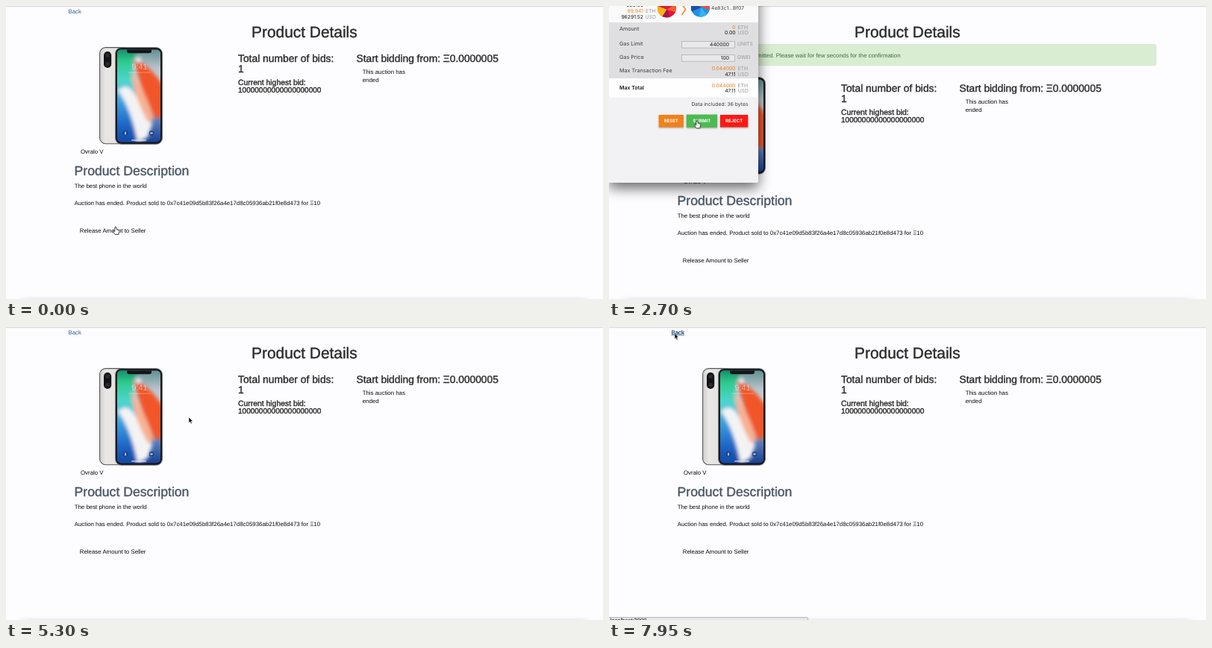
Recreate the animation shown at these times as an HTML page. Size 800 px wide and 393 px high, loop 8 s.

```html
<!DOCTYPE html>
<html lang="en">
<head>
<meta charset="utf-8">
<title>Product Details</title>
<style>
  html, body { margin: 0; width: 100%; height: 100%; overflow: hidden; background: #fdfcfe; }
  svg { display: block; width: 100%; height: 100%; font: 7.86px "Liberation Sans", Arial, sans-serif; fill: #0c0c0c; text-rendering: geometricPrecision; }
  .medium { stroke: currentColor; stroke-width: .4; color: #2b2b2b; fill: #2b2b2b; }
  .slate { color: #4b5766; fill: #4b5766; }
  .end { text-anchor: end; }
  .mid { text-anchor: middle; }

  .popup { font: 7.2px Inter, "Open Sans", sans-serif; fill: #3c3c3e; filter: drop-shadow(0 7px 9px rgba(0, 0, 0, .6)); }
  .small { font-size: 6.8px; }
  .eth { fill: #f08122; }
  .unit { fill: #98989b; }
  .dark { fill: #161616; }
  .button { font-size: 6px; font-weight: 700; fill: #fff; text-anchor: middle; }
  .button rect { filter: drop-shadow(0 1px 1px rgba(0, 0, 0, .35)); }

  .page, .alert, .popup, .ring, .status, .hover, .hand, .arrow { animation: 8s step-end infinite; }
  .page { animation-name: page; }
  .alert { animation-name: alert; }
  .popup { animation-name: popup; }
  .ring { animation-name: ring; }
  .status, .hover { animation-name: late; }
  .hand { animation-name: hand; }
  .arrow { animation-name: arrow; }
  .cursor { animation: move 8s ease-in-out infinite; }

  @keyframes page { 0%, 58.75% { transform: none; } 5% { transform: translateY(40px); } }
  @keyframes alert { 0%, 58.75% { opacity: 0; } 5% { opacity: 1; } }
  @keyframes popup { 0%, 47.5% { opacity: 0; } 8.75% { opacity: 1; } }
  @keyframes ring { 0%, 8.75%, 58.75% { opacity: 0; } 3.75%, 47.5% { opacity: 1; } }
  @keyframes late { 0% { opacity: 0; } 95% { opacity: 1; } }
  @keyframes hand { 0%, 17.5% { opacity: 1; } 12%, 47.5% { opacity: 0; } }
  @keyframes arrow { 0%, 17.5% { opacity: 0; } 12%, 47.5% { opacity: 1; } }
  @keyframes move {
    0%, 11.5% { transform: translate(146px, 296px); }
    19.5%, 23% { transform: translate(121px, 149.5px); }
    29%, 54.5% { transform: translate(117px, 153.5px); }
    62%, 86.5% { transform: translate(245px, 121px); }
    95%, 100% { transform: translate(88px, 8.5px); }
  }
</style>
</head>
<body>
<svg viewBox="0 0 800 393" preserveAspectRatio="none">
  <defs>
    <linearGradient id="silver">
      <stop stop-color="#cfcecc"/><stop offset=".2" stop-color="#e9e8e6"/><stop offset="1" stop-color="#dcdbd8"/>
    </linearGradient>
    <linearGradient id="left" x2="0" y2="1">
      <stop stop-color="#0d6a58"/><stop offset=".17" stop-color="#2ccb8c"/><stop offset=".36" stop-color="#4fd6cf"/>
      <stop offset=".55" stop-color="#3aa0e2"/><stop offset=".8" stop-color="#1b5fc0"/><stop offset="1" stop-color="#123f94"/>
    </linearGradient>
    <linearGradient id="right" x2="0" y2="1">
      <stop stop-color="#5f8f92"/><stop offset=".2" stop-color="#b9c3cb"/><stop offset=".45" stop-color="#dfe0e4"/>
      <stop offset=".65" stop-color="#7fa0d2"/><stop offset="1" stop-color="#173f92"/>
    </linearGradient>
    <filter id="soft" x="-40%" y="-40%" width="180%" height="180%"><feGaussianBlur stdDeviation="2.6"/></filter>
    <filter id="glow" x="-10%" y="-30%" width="120%" height="160%"><feGaussianBlur stdDeviation="1"/></filter>
    <filter id="fade" x="-5%" y="-150%" width="110%" height="400%"><feGaussianBlur stdDeviation="6 2.4"/></filter>
    <clipPath id="screen"><rect x="149" y="58.5" width="58" height="124" rx="5"/></clipPath>
    <clipPath id="disc"><circle r="12.7"/></clipPath>
  </defs>

  <rect width="800" height="393" fill="#fdfcfe"/>
  <rect width="800" height="1.3" fill="#dcdbde"/>
  <rect x="22" y="392.5" width="756" height="8" fill="#dedde0" filter="url(#fade)"/>

  <text x="83.5" y="9.8" fill="#2f64a0">Back</text>
  <g class="hover"><text x="83.5" y="9.8" fill="#23527c">Back</text><rect x="83.5" y="10.7" width="17.5" height=".7" fill="#23527c"/></g>
  <text class="medium" x="329" y="42.3" font-size="20.9">Product Details</text>

  <g class="alert">
    <rect x="83.5" y="51.5" width="649.5" height="28.3" rx="2" fill="#d9edd2" stroke="#cfe5c5" stroke-width=".7"/>
    <text x="92" y="68.6" fill="#3f6d40">Your transaction has been submitted. Please wait for few seconds for the confirmation</text>
  </g>

  <g class="page">
    <rect x="125.6" y="55.6" width="40" height="129.2" rx="8" fill="url(#silver)" stroke="#55565a" stroke-width="1.1"/>
    <rect x="131" y="61" width="10.2" height="22" rx="5.1" fill="#131417"/>
    <circle cx="136.1" cy="66.3" r="2.6" fill="#2b2d33"/>
    <circle cx="136.1" cy="77.5" r="2.6" fill="#2b2d33"/>
    <rect x="146.6" y="55.7" width="62.8" height="129.6" rx="8" fill="#141518" stroke="#77787d" stroke-width="1"/>
    <g clip-path="url(#screen)">
      <rect x="149" y="58" width="58" height="125" fill="url(#right)"/>
      <g filter="url(#soft)">
        <path d="M140 50H182L170 74C170 100 176 130 184 156L188 192H140Z" fill="url(#left)"/>
        <path d="M150 113C160 104 168 108 176 124L196 158 190 176 176 182C172 160 164 132 150 113Z" fill="#f4f3f4"/>
        <path d="M172 72C186 76 200 90 212 108V146L200 152C190 130 178 106 172 72Z" fill="#f0562c"/>
        <path d="M168 88C176 100 190 122 198 152L190 156C180 136 170 116 168 88Z" fill="#f7b193"/>
        <circle cx="177.5" cy="72" r="3.5" fill="#effaf4"/>
      </g>
      <path d="M162 58H195V60.5Q195 63.2 192 63.2H165Q162 63.2 162 60.5Z" fill="#141518"/>
      <text class="mid" x="179" y="84.5" font-size="10.8" fill="#fff" fill-opacity=".5">9:41</text>
      <rect x="164" y="88.7" width="30" height="1" fill="#fff" opacity=".3"/>
      <circle cx="160" cy="170.5" r="3.4" fill="#173c7d" opacity=".7"/>
      <circle cx="195" cy="170.5" r="3.4" fill="#173c7d" opacity=".7"/>
      <path d="M160 168.7V172.4M193.5 170.5H196.5" stroke="#fff" stroke-width="1.3"/>
      <rect x="168" y="179.5" width="20" height="1" rx=".5" fill="#fff"/>
    </g>

    <text x="100" y="198.3">Ovralo V</text>
    <g class="medium">
      <text x="311" y="74.6" font-size="13.84">Total number of bids:</text>
      <text x="311" y="89.2" font-size="13.84">1</text>
      <text x="311" y="105.7" font-size="10.4">Current highest bid:</text>
      <text x="311" y="116.4" font-size="10.03">10000000000000000000</text>
      <text x="469.5" y="74.6" font-size="13.78">Start bidding from: Ξ0.0000005</text>
      <text class="slate" x="91.5" y="227.4" font-size="17.65">Product Description</text>
    </g>
    <text x="477.7" y="90.5">This auction has</text>
    <text x="477.7" y="101.6">ended</text>
    <text x="91.7" y="244.4">The best phone in the world</text>
    <text x="91.7" y="266.7">Auction has ended. Product sold to 0x7c41e09d5b83f26a4e17d8c05936ab21f0e8d473 for Ξ10</text>
    <g class="ring">
      <rect x="91.3" y="291.3" width="103" height="19.6" rx="1.5" fill="none" stroke="#66afe9" stroke-width="2.4" filter="url(#glow)"/>
      <rect x="91.8" y="291.8" width="102" height="18.6" rx="1.5" fill="#fff" stroke="#5fa3d8"/>
    </g>
    <text x="98.8" y="303.8">Release Amount to Seller</text>
  </g>

  <g class="popup">
    <path d="M0-30H200V235Q200 237 198 237H0Z" fill="#f2f1f3"/>
    <rect y="-30" width="200" height="52" fill="#fafafb"/>
    <rect y="22" width="200" height="75" fill="#dfdee0"/>
    <rect y="97" width="200" height="25.5" fill="#fefefe"/>

    <g class="small">
      <text class="end dark" x="46" y="1.4">820.00</text>
      <text class="end eth" x="46" y="9.2">89.941</text><text class="unit" x="49" y="9.2">ETH</text>
      <text class="end dark" x="46" y="16.7">96291.52</text><text class="unit" x="48.5" y="16.7">USD</text>
      <text x="137" y="4.8">4e83c1...Bf07</text>
    </g>
    <g transform="translate(77.5 2.8)" clip-path="url(#disc)">
      <circle r="13" fill="#e3173e"/>
      <path d="M-13-3 0 2-7 13H-13Z" fill="#f6b414"/>
      <path d="M0 2 13-6V6Z" fill="#f2632d"/>
      <path d="M-7 13 0 2 5 13Z" fill="#a51652"/>
    </g>
    <path d="M97.5-3 102.5 4.5 97.5 12" fill="none" stroke="#f5882a" stroke-width="1.6"/>
    <g transform="translate(122.5 2)" clip-path="url(#disc)">
      <circle r="13" fill="#2491e5"/>
      <path d="M-13-9 1 0-13 6Z" fill="#1d4fa8"/>
      <path d="M1 0 13-10V3Z" fill="#ef4a3d"/>
      <path d="M1 0 11 13H-2Z" fill="#31b6ee"/>
    </g>

    <text x="14" y="33.3">Amount</text>
    <text x="14" y="53.2">Gas Limit</text>
    <text x="14" y="71.3">Gas Price</text>
    <text x="14" y="89">Max Transaction Fee</text>
    <text class="dark" x="14" y="111.6" font-weight="600" font-size="7">Max Total</text>

    <g fill="#e9e8ea" stroke="#a9a9ac" stroke-width=".7">
      <rect x="97.4" y="47.4" width="71" height="8.8"/>
      <rect x="97.4" y="65.4" width="71" height="8.8"/>
    </g>
    <g class="small">
      <g class="end">
        <text class="eth" x="169.5" y="30.6">0</text><text class="dark" x="169.5" y="38.2">0.00</text>
        <text class="dark" x="161" y="54.3">440000</text><text class="dark" x="161" y="72.3">100</text>
        <text class="eth" x="169.5" y="86.3">0.044000</text><text class="dark" x="169.5" y="93.9">47.11</text>
        <text class="eth" x="169.5" y="109">0.044000</text><text class="dark" x="169.5" y="116.4">47.11</text>
        <text x="186.5" y="134.2">Data included: 36 bytes</text>
      </g>
      <g class="unit">
        <text x="172.5" y="30.6">ETH</text><text x="172.5" y="38.2">USD</text>
        <text x="172" y="52.8">UNITS</text><text x="172" y="70.8">GWEI</text>
        <text x="172.5" y="86.3">ETH</text><text x="172.5" y="93.9">USD</text>
        <text x="172.5" y="109">ETH</text><text x="172.5" y="116.4">USD</text>
      </g>
    </g>

    <g class="button">
      <rect x="66.8" y="146" width="33" height="16.5" fill="#f18118"/><text x="83.3" y="156.4">RESET</text>
      <rect x="103.8" y="145.6" width="41.2" height="17.3" fill="#4dbb51"/><text x="124.4" y="156.4">SUBMIT</text>
      <rect x="149" y="146" width="37.2" height="16.5" fill="#fb1913"/><text x="167.6" y="156.4">REJECT</text>
    </g>
  </g>

  <g class="status">
    <rect x="-1" y="389.5" width="267.5" height="8" rx="1.5" fill="#e7e6e8" stroke="#a9a8ab" stroke-width=".8"/>
    <text x="1.5" y="396.4" font-size="7.6">localhost:3000</text>
  </g>

  <g class="cursor">
    <path class="hand" d="M0 .6Q1.2-.4 1.9 1L2.4 3.8 5 4.4Q6 4.8 5.8 6.5L4.9 10.4H.2L-3.1 6.4Q-2.6 5-.9 6.3L-.3 6.4Z" fill="#fff" stroke="#222" stroke-width=".9" stroke-linejoin="round"/>
    <path class="arrow" d="M0 0V7.6L1.7 6 2.9 8.8 4.2 8.2 3 5.5H5.3Z" fill="#000" stroke="#fff" stroke-width=".5"/>
  </g>
</svg>
</body>
</html>
```
